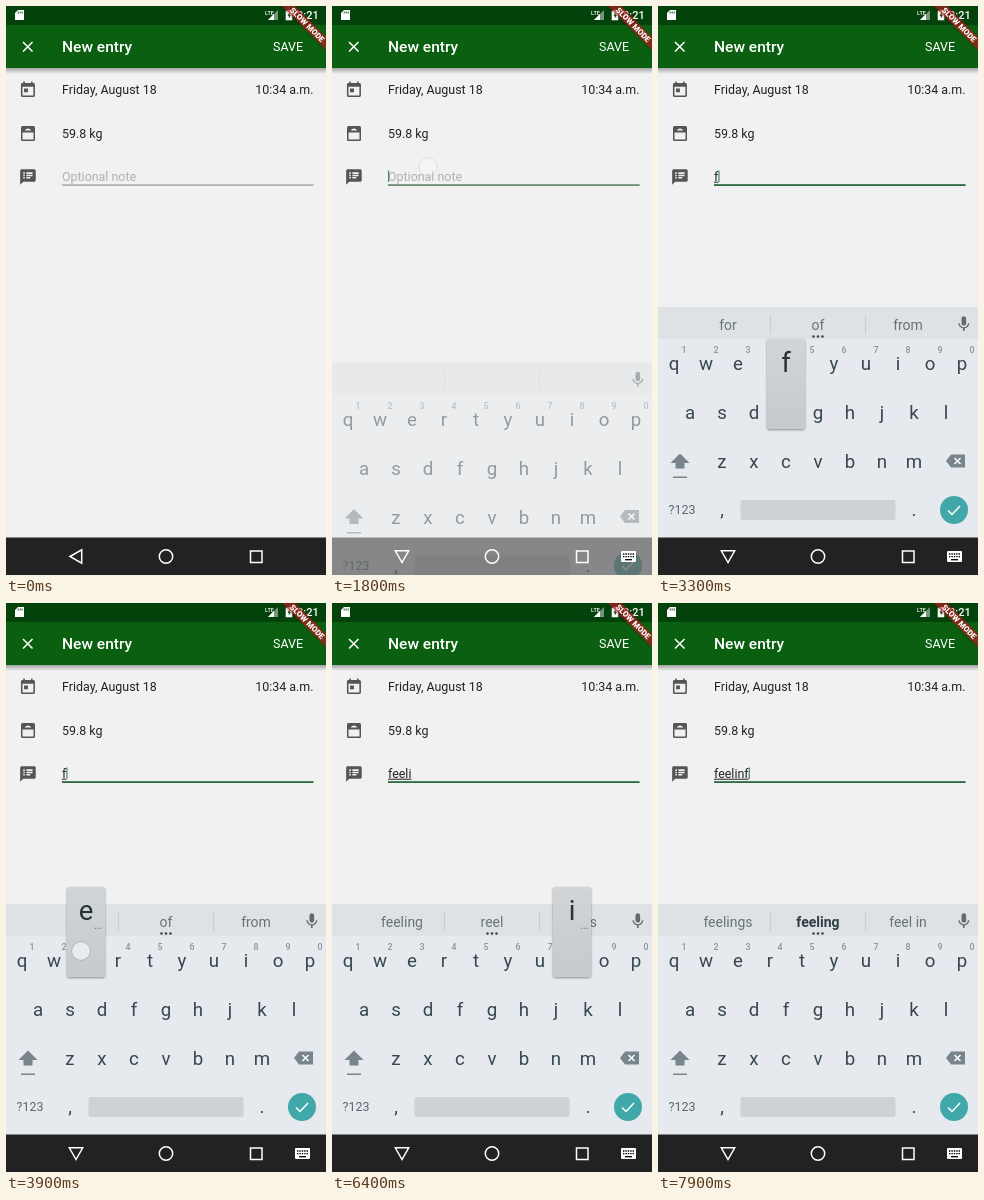
Recreate the animation shown at these times as an HTML page. Size 320 by 569 pixels, loop 8 s.

```html
<!DOCTYPE html>
<html lang="en">
<head>
<meta charset="utf-8">
<title>New entry</title>
<style>
html, body { margin: 0; width: 100%; height: 100%; overflow: hidden; }
svg { display: block; font-family: Roboto, sans-serif; font-size: 12.44px; fill: #222; }
.mid { text-anchor: middle; }
.key { font-size: 18.7px; fill: #37474f; text-anchor: middle; }
.hint { font-size: 8.8px; font-weight: 500; fill: #89949a; text-anchor: middle; }
.icon { fill: #555; }
.grey { fill: #78858b; }
.white { fill: #fff; }
.line { fill: none; stroke: #fff; stroke-width: 1.5; }
</style>
</head>
<body>
<svg width="320" height="569" viewBox="0 0 320 569">
  <defs>
    <linearGradient id="shade" x2="0" y2="1">
      <stop stop-opacity=".32"/><stop offset="1" stop-opacity="0"/>
    </linearGradient>
    <linearGradient id="pop" x2="0" y2="1">
      <stop stop-color="#d1d5d8"/><stop offset="1" stop-color="#c5cacd"/>
    </linearGradient>
    <filter id="drop" x="-30%" y="-30%" width="160%" height="160%">
      <feDropShadow dx="0" dy="1" stdDeviation="1.2" flood-opacity=".4"/>
    </filter>
  </defs>

  <rect width="320" height="569" fill="#f1f1f1"/>
  <rect y="62" width="320" height="6" fill="url(#shade)"/>
  <rect width="320" height="62" fill="#0a6010"/>
  <rect width="320" height="19" fill="#04420b"/>

  <!-- status bar -->
  <g class="white">
    <path d="M12 4h6v10H9V7z"/>
    <path d="M12.2 5.5v2M14.2 5.5v2M16.2 5.5v2" stroke="#04420b" stroke-width=".9"/>
    <text x="259" y="9" font-size="5.5" font-weight="500">LTE</text>
    <path d="M272 4v10h-10z" opacity=".45"/>
    <path d="M268 8v6h-6z"/>
    <path d="M281.500 4.700v-1h3v1h1.800v9.500h-6.600v-9.500z"/>
    <path d="M283.600 6.300l-2 3.400h1.200v2.800l2-3.600h-1.200z" fill="#04420b"/>
    <text x="291" y="13" font-size="11" font-weight="500">8:21</text>
  </g>

  <!-- app bar -->
  <path class="line" d="M17 36l9.500 9.500M26.500 36l-9.500 9.500"/>
  <text class="white" x="56" y="46" font-size="15.55" font-weight="500">New entry</text>
  <text class="white" x="267" y="45">SAVE</text>
  <g transform="translate(320) rotate(45)">
    <rect x="-31" y="21.800" width="62" height="9.300" fill="#b71c1c" fill-opacity=".63" filter="url(#drop)"/>
    <text class="white mid" y="29.300" font-size="7.900" font-weight="900">SLOW MODE</text>
  </g>

  <!-- form -->
  <path class="icon" transform="translate(12.600 74.600) scale(.778)" fill-rule="evenodd" d="M19 3h-1V1h-2v2H8V1H6v2H5c-1.100 0-2 .9-2 2v14c0 1.100.9 2 2 2h14c1.100 0 2-.9 2-2V5c0-1.100-.9-2-2-2zm0 16H5V8h14zM7 10h5v5H7z"/>
  <rect class="icon" x="15" y="120" width="14" height="15" rx="1.500"/>
  <path d="M16.500 126.500h11v7h-11zM18.500 124.500q3.500-4 7 0z" fill="#f1f1f1"/>
  <path class="icon" transform="translate(12.600 161.700) scale(.778)" fill-rule="evenodd" d="M20 2H4C2.900 2 2 2.900 2 4v18l4-4h14c1.100 0 2-.9 2-2V4c0-1.100-.9-2-2-2zM8 14H6v-2h2zm0-3H6V9h2zm0-3H6V6h2zm7 6h-5v-2h5zm3-3h-8V9h8zm0-3h-8V6h8z"/>
  <text x="56" y="88.300">Friday, August 18</text>
  <text x="307.500" y="88.300" text-anchor="end">10:34 a.m.</text>
  <text x="56" y="132">59.8 kg</text>
  <text id="hint" x="56" y="174.500" fill="#b0b0b0">Optional note</text>
  <text id="note" x="56" y="174.500"></text>
  <rect id="under" x="56" y="175.700" height="1" fill="#222"/>
  <rect x="56" y="178.300" width="251.500" height="1.600" fill="#acacac"/>
  <rect id="focus" x="56" y="178.300" width="251.500" height="1.600" fill="#1f6633"/>
  <rect id="cursor" y="164.500" width="1.200" height="11.500" fill="#3f8a68"/>

  <g id="board">
    <rect y="301" width="320" height="290" fill="#e6eaee"/>
    <rect y="301" width="320" height="32" fill="#dfe2e4"/>
    <path d="M112.500 309v19M207.500 309v19" stroke="#c9cdcf"/>
    <path fill="#5f6b71" transform="translate(296.500 308.700) scale(.778)" d="M12 14c1.700 0 3-1.300 3-3V5c0-1.700-1.300-3-3-3S9 3.300 9 5v6c0 1.700 1.300 3 3 3zm5.300-3c0 3-2.500 5.100-5.300 5.100S6.700 14 6.700 11H5c0 3.400 2.700 6.200 6 6.700V21h2v-3.300c3.300-.5 6-3.300 6-6.700z"/>
    <g id="words"></g>
    <g id="keys"></g>
    <path class="grey" d="M22 447.500l9.500 9.500h-5v5.500h-9V457h-5zM15 470.500h14v1.400H15z"/>
    <path class="grey" d="M288 455l5-6.500h14v13h-14z"/>
    <path class="line" stroke-width="1.300" d="M296.500 452l6 6M302.500 452l-6 6"/>
    <text class="mid" x="24" y="508.300" fill="#5a666c">?123</text>
    <text class="key" x="64" y="510">,</text>
    <text class="key" x="256" y="510">.</text>
    <rect x="82.500" y="494" width="155" height="20" rx="2" fill="#cdd2d5"/>
    <circle cx="296" cy="504" r="14" fill="#40a8a8"/>
    <path class="line" d="M290 504.500l4 4 8-8.500"/>
  </g>

  <rect id="bar" y="531.500" width="320" height="38"/>
  <path id="back" class="line" d="M64 550.500l11.700-6.700v13.400z"/>
  <circle class="line" cx="160" cy="550.500" r="6.700"/>
  <rect class="line" x="244.500" y="545" width="11.500" height="11.500"/>
  <g id="toggle">
    <rect class="white" x="289" y="545" width="15" height="11" rx="1"/>
    <path d="M291 548h11M291 550.700h11" stroke="#000" stroke-width="1.300" stroke-dasharray="1.400 1"/>
    <path d="M293 553.700h7" stroke="#000" stroke-width="1.300"/>
  </g>

  <g id="popup">
    <rect x="-19" y="-73" width="38" height="90" rx="2" fill="url(#pop)" filter="url(#drop)"/>
    <text id="big" class="mid" y="-40" font-size="27.500" fill="#263238"></text>
    <text id="more" class="mid" x="12" y="-31" font-size="13" fill="#75828a">…</text>
  </g>
  <circle id="touch" r="9.300" fill="#fff" fill-opacity=".6" stroke="#7f8c98" stroke-opacity=".45"/>
</svg>

<script>
const LOOP = 8000, STEP = 100;
const $ = id => document.getElementById(id);
const set = (id, attrs) => {
  for (const name in attrs) $(id).setAttribute(name, attrs[name]);
};

// Each track lists [start time, value...]; the latest started entry holds.
const notes = [[0, ''], [3200, 'f'], [4100, 'fe'], [4400, 'fee'], [5600, 'feel'],
  [6300, 'feeli'], [6800, 'feelin'], [7800, 'feelinf']];
const blinks = [[0, 0], [1400, 1], [1900, 0], [2400, 1], [2800, 0], [3200, 1],
  [4800, 0], [5600, 1], [6300, 0], [6600, 1], [7200, 0], [7600, 1]];
const guesses = [[0, ''], [3300, 'for,of,from'], [4300, 'free,few,feet'],
  [5900, 'feeling,reel,feels'], [6600, 'feelings,feeling,feels'],
  [7200, 'feelings,feeling,feel in', 700]];
const presses = [[0, ''], [3000, 'f'], [3400, ''], [3900, 'e'], [4400, ''], [5600, 'l'],
  [6200, 'i'], [6600, ''], [6800, 'n'], [7200, ''], [7600, 'f'], [7900, '']];
const touches = [[0], [1100, 96, 161, 1], [1600, 96, 161, .7], [1800, 96, 161, .4], [1900],
  [2800, 128, 408, 1], [3200], [3900, 75, 348, 1], [4100], [4200, 75, 348, 1], [4300],
  [5400, 278, 409, 1], [5700], [6100, 240, 350, 1], [6300], [6600, 227, 446, 1], [7000],
  [7600, 128, 408, 1], [7800]];
const at = (track, t) => track.findLast(entry => entry[0] <= t).slice(1);

const keys = {};
let markup = '';
['qwertyuiop', 'asdfghjkl', 'zxcvbnm'].forEach((row, r) => [...row].forEach((ch, i) => {
  const x = 16 + 16 * [0, 1, 3][r] + 32 * i, y = 357 + 49 * r;
  keys[ch] = [x, y];
  markup += `<text class="key" x="${x}" y="${y + 7}">${ch}</text>`;
  if (!r) markup += `<text class="hint" x="${x + 10}" y="347">${(i + 1) % 10}</text>`;
}));
$('keys').innerHTML = markup;

function showWords(list, weight = 400) {
  const words = list ? list.split(',') : [];
  $('words').innerHTML = words.map((word, i) => {
    const bold = i === 1 && weight > 400;
    return `<text class="mid" x="${70 + 90 * i}" y="324" font-size="14"
      font-weight="${bold ? weight : 400}" fill="${bold ? '#2f3d45' : '#66737a'}">${word}</text>`;
  }).join('') + (words.length
    ? [155.5, 160, 164.5].map(x => `<circle cx="${x}" cy="330.5" r="1.3" fill="#37474f"/>`).join('')
    : '');
}

function draw(t) {
  const p = Math.min(1, Math.max(0, (t - 1500) / 600));
  set('board', { opacity: p, transform: `translate(0 ${222 * (1 - p) ** 2})` });
  set('bar', { opacity: 1 - .5 * Math.sin(Math.PI * p) });
  set('focus', { opacity: p });
  set('back', { transform: t >= 1700 ? 'rotate(-90 70 550.5)' : '' });
  set('toggle', { opacity: t >= 1700 ? 1 : 0 });

  const [note] = at(notes, t);
  $('note').textContent = note;
  const width = note ? $('note').getComputedTextLength() : 0;
  set('hint', { opacity: note ? 0 : 1 });
  set('under', { width });
  set('cursor', { x: 56 + width, opacity: at(blinks, t)[0] });
  showWords(...at(guesses, t));

  const [key] = at(presses, t);
  $('big').textContent = key;
  set('popup', { opacity: key ? 1 : 0, transform: `translate(${keys[key] || '0 0'})` });
  set('more', { opacity: 'ein'.includes(key) ? 1 : 0 });

  const [cx = 0, cy = 0, opacity = 0] = at(touches, t);
  set('touch', { cx, cy, opacity });
}

const start = performance.now();
let shown = -1;
function tick() {
  const t = Math.floor((performance.now() - start) % LOOP / STEP) * STEP;
  if (t !== shown) draw(shown = t);
  requestAnimationFrame(tick);
}
tick();
</script>
</body>
</html>
```
